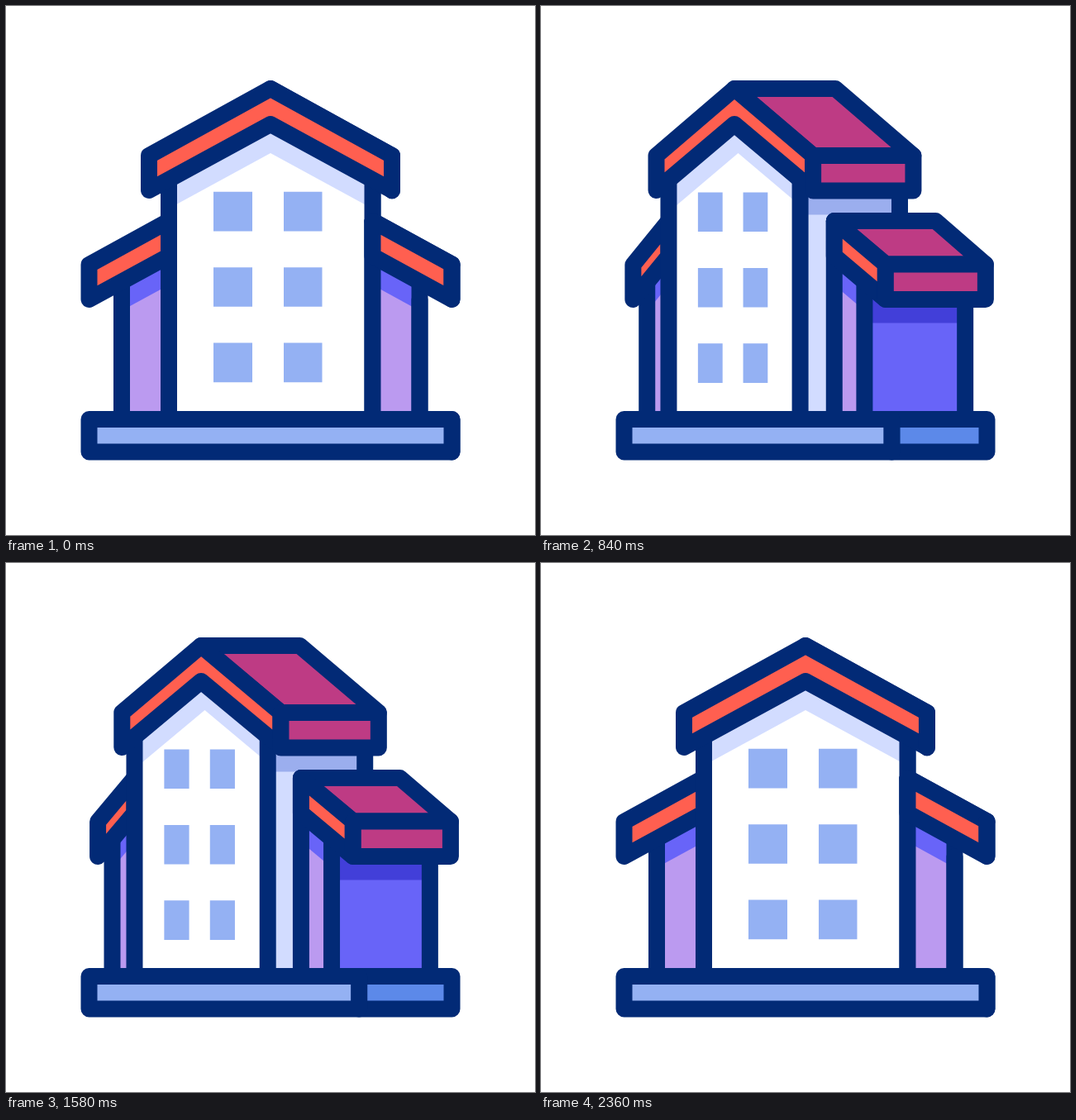
These frames come from a looping animation (640x640 px, 2.4 s). An HTML page with a canvas:

```html
<!DOCTYPE html>
<html lang="en">
<head>
<meta charset="utf-8">
<title>Turning house</title>
<style>
  html, body { margin: 0; width: 100%; height: 100%; overflow: hidden; background: #fff; }
  canvas { display: block; width: 640px; height: 640px; }
</style>
</head>
<body>
<canvas id="stage" width="640" height="640"></canvas>
<script>
const ctx = document.getElementById('stage').getContext('2d');
const LOOP = 2400;
const C = {
  line: '#022a76', red: '#ff5f50', magenta: '#be3b84', white: '#ffffff',
  pale: '#d2dcff', paleShade: '#9baeee', pane: '#94b1f3', baseSide: '#5c89e9',
  lilac: '#bb9af0', violet: '#6864f8', deep: '#423fd9'
};

// Symmetric cubic ease with handles at (a, 0) and (1 - a, 1).
function ease(x, a = 0.7) {
  if (x <= 0) return 0;
  if (x >= 1) return 1;
  let lo = 0, hi = 1;
  for (let i = 0; i < 30; i++) {
    const u = (lo + hi) / 2, v = 1 - u;
    if (3 * a * u * v * v + 3 * (1 - a) * u * u * v + u * u * u < x) lo = u;
    else hi = u;
  }
  return lo * lo * (3 - 2 * lo);
}

function turnAt(ms) {
  const s = ms < 1200 ? ease((ms - 4) / 1196) : 1 - ease((ms - 1200) / 1180);
  return s * 1.005;
}

function trace(points, closed) {
  ctx.beginPath();
  points.forEach(([x, y]) => ctx.lineTo(x, y));
  if (closed) ctx.closePath();
}

function fill(color, points) {
  trace(points, true);
  ctx.fillStyle = color;
  ctx.fill();
}

function stroke(points, closed) {
  trace(points, closed);
  ctx.stroke();
}

function shape(color, points) {
  fill(color, points);
  stroke(points, true);
}

const box = (l, t, r, b) => [[l, t], [r, t], [r, b], [l, b]];
const post = (x, top) => stroke([[x, top], [x, 500]], false);

function draw(ms) {
  const s = turnAt(ms);
  const at = (front, turned) => front + (turned - front) * s;

  ctx.fillStyle = C.white;
  ctx.fillRect(0, 0, 640, 640);
  ctx.strokeStyle = C.line;
  ctx.lineWidth = 20;
  ctx.lineJoin = ctx.lineCap = 'round';

  const wallL = at(197, 150), wallR = at(443.5, 300), wallBack = at(443.5, 433);

  // Left wing
  {
    const eave = at(100.5, 112.5), side = at(140, 127);
    const slope = 52.5 / (wallL - eave);
    const under = x => 302.5 + (wallL - x) * slope;
    const face = drop => [[side, under(side) + drop], [wallL, under(wallL) + drop], [wallL, 500], [side, 500]];
    fill(C.violet, face(0));
    fill(C.lilac, face(35));
    post(side, under(side));
    shape(C.red, [[eave, 313], [wallL, 260], [wallL, 302.5], [eave, 355]]);
  }

  // Main block
  {
    const apex = at(320, 225), backApex = at(320, 360);
    const eaveL = at(173, 136), eaveR = at(467, 314.7), eaveBack = at(467, 448.7);
    const slope = 80 / (apex - eaveL);
    const under = x => 143 + Math.abs(x - apex) * slope;

    fill(C.pale, box(wallR, 200, wallBack, 500));
    fill(C.paleShade, box(wallR, 200, wallBack, 252.5));
    post(wallBack, 215);

    const gable = (peak, top) => {
      const y = x => top + Math.abs(x - peak) * slope;
      return [[wallL, y(wallL)], [peak, top], [wallR, y(wallR)], [wallR, 500], [wallL, 500]];
    };
    fill(C.pale, gable(apex, 143));
    fill(C.white, gable(at(320, 230), 178));

    const columns = [[at(251, 183.5), at(298, 211.5)], [at(336, 235), at(382.5, 263)]];
    for (const [l, r] of columns) {
      for (let row = 0; row < 3; row++) {
        const top = 224.8 + row * 91.4 + 0.8 * s;
        fill(C.pane, box(l, top, r, top + 47.6));
      }
    }
    post(wallL, under(wallL));
    post(wallR, under(wallR));

    shape(C.magenta, [[apex, 100], [backApex, 100], [eaveBack, 181], [eaveR, 181]]);
    shape(C.red, [[eaveL, 181], [apex, 100], [eaveR, 181], [eaveR, 223], [apex, 143], [eaveL, 223]]);
    shape(C.magenta, box(eaveR, 181, eaveBack, 223.5));
  }

  // Right wing
  {
    const near = at(443.5, 345.5), backTop = at(443.5, 481);
    const eave = at(539.5, 404), eaveBack = at(539.5, 537.7);
    const corner = at(500.5, 380), side = at(500.5, 514.5);
    const slope = 52.5 / (eave - near);
    const under = x => 302.5 + (x - near) * slope;
    const face = drop => [[near, under(near) + drop], [corner, under(corner) + drop], [corner, 500], [near, 500]];

    fill(C.violet, face(0));
    fill(C.lilac, face(35));
    fill(C.violet, box(corner, 350, side, 500));
    fill(C.deep, box(corner, 350, side, at(379, 384)));
    post(near, 260);
    post(corner, under(corner));
    post(side, 355);

    shape(C.magenta, [[near, 260], [backTop, 260], [eaveBack, 312.5], [eave, 312.5]]);
    shape(C.red, [[near, 260], [eave, 312.5], [eave, 355], [near, 302.5]]);
    shape(C.magenta, box(eave, 312.5, eaveBack, 355));
  }

  // Plinth
  const edge = at(539.5, 412.3);
  shape(C.baseSide, box(edge, 500, 539.5, 539.5));
  shape(C.pane, box(100.5, 500, edge, 539.5));
}

function tick() {
  draw(performance.now() % LOOP);
  requestAnimationFrame(tick);
}
tick();
</script>
</body>
</html>
```
